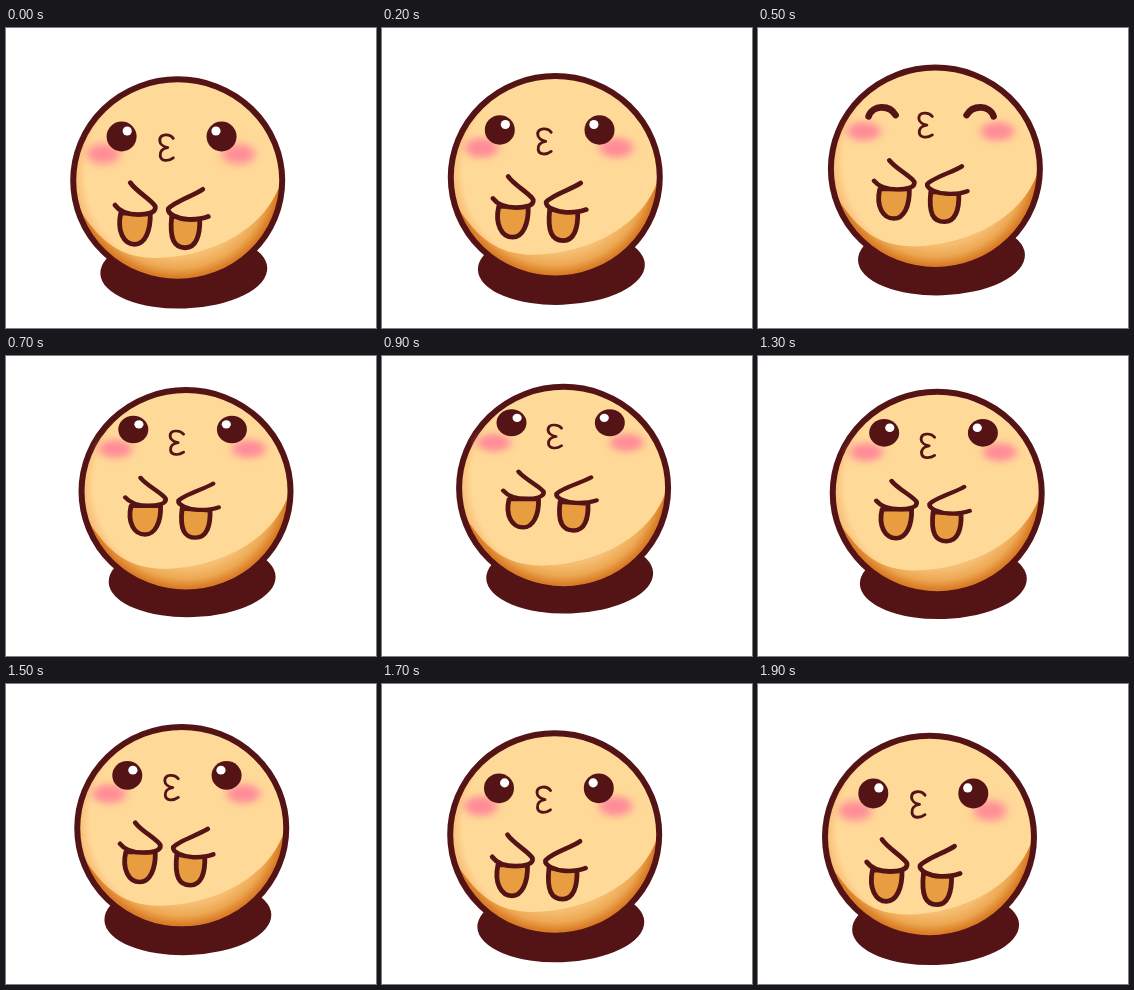
Recreate the animation shown at these times as an HTML page. Size 370 px wide and 300 px high, loop 2000 ms.

```html
<!DOCTYPE html>
<html lang="en">
<head>
<meta charset="utf-8">
<title>Nodding kiss face</title>
<style>
  html, body { margin: 0; width: 100%; height: 100%; overflow: hidden; background: #fff; }
  svg { display: block; width: 370px; height: 300px; --p: 0; --ink: #541416; }
  /* --p runs from 0 (head low) to 1 (head high); each part has its own travel */
  .part { transform: translate(calc(var(--p) * var(--dx)), calc(var(--p) * var(--dy))); }
  .squash { transform: scaleY(calc(1 - var(--flat) * var(--p))); }
  .line { fill: none; stroke: var(--ink); stroke-linecap: round; stroke-linejoin: round; }
  .finger { fill: #e89e40; }
  .palm { fill: #ffd998; }
  .ink { fill: var(--ink); }
  .closed, .blink .open { display: none; }
  .blink .closed { display: inline; }
</style>
</head>
<body>
<svg id="face" viewBox="0 0 370 300">
  <defs>
    <radialGradient id="shade" gradientUnits="userSpaceOnUse" cx="0" cy="0" r="1"
      gradientTransform="translate(171.5 153) scale(103 99.5)">
      <stop offset=".77" stop-color="#f6be72"/>
      <stop offset=".88" stop-color="#eda852"/>
      <stop offset=".97" stop-color="#da7d26"/>
    </radialGradient>
    <radialGradient id="rim" gradientUnits="userSpaceOnUse" cx="0" cy="0" r="1"
      gradientTransform="translate(178 146) scale(112 110)">
      <stop offset=".88" stop-color="#f0a050" stop-opacity="0"/>
      <stop offset="1" stop-color="#f0a050" stop-opacity=".6"/>
    </radialGradient>
    <ellipse id="ball" cx="171.5" cy="153" rx="104.5" ry="101.2"/>
    <clipPath id="inside"><use href="#ball"/></clipPath>
    <filter id="soft" x="-50%" y="-80%" width="200%" height="260%">
      <feGaussianBlur stdDeviation="4"/>
    </filter>
    <g id="eye">
      <g class="open squash" style="--flat:.1">
        <circle class="ink" r="15"/>
        <circle cx="5.6" cy="-5.5" r="4.6" fill="#fff"/>
      </g>
      <path class="line closed" stroke-width="6.6" d="M-13 3.8C-9-8 8-8 14 2.600"/>
    </g>
    <g id="blush">
      <g class="squash" style="--flat:.12">
        <ellipse rx="16.8" ry="10" fill="#ff8c98" filter="url(#soft)"/>
      </g>
    </g>
  </defs>

  <g class="part" style="--dx:10.3px;--dy:-24px">
    <ellipse class="ink" rx="83.5" ry="37.8" transform="translate(177.6 243.2) rotate(-2)"/>
  </g>

  <g class="part" style="--dx:10.3px;--dy:-21.4px">
    <use href="#ball" fill="#ffd998"/>
    <use href="#ball" fill="url(#rim)"/>
    <path clip-path="url(#inside)" fill="url(#shade)"
      d="M277 145C266 200 206 230 148 230.500C114 230 94 214 74 183L60 270H290Z"/>
    <use href="#ball" class="line" stroke-width="6"/>
  </g>

  <g class="part" style="--dx:15px;--dy:-41px">
    <use href="#blush" transform="translate(97 126.800)"/>
  </g>
  <g class="part" style="--dx:13px;--dy:-41px">
    <use href="#blush" transform="translate(232 126.800)"/>
  </g>

  <g class="part" style="--dx:14.500px;--dy:-43.500px">
    <use href="#eye" transform="translate(115.300 109.400)"/>
  </g>
  <g class="part" style="--dx:12.800px;--dy:-43.500px">
    <use href="#eye" transform="translate(215.300 109.400) scale(-1 1)"/>
  </g>

  <g class="part" style="--dx:12.800px;--dy:-40.800px">
    <g transform="translate(160 120.700)">
      <path class="line squash" style="--flat:.1" stroke-width="2.900"
        d="M7-9.500C3.500-14.500-6.500-14.500-6.500-7.500C-6.500-3.500-2-1 1.500-.3C-4 .5-6.500 4-6 8C-5.300 13.500 2 13.800 7 10"/>
    </g>
  </g>

  <g class="part" style="--dx:12.800px;--dy:-40.600px">
    <g class="line" stroke-width="4.800" transform="translate(0 155)">
      <g class="squash" style="--flat:.1">
        <path class="finger" d="M114.500 31C110.500 49 117.500 62.300 128.500 62.300C138.500 62.300 144.500 49 144 31Z"/>
        <path class="finger" d="M165.500 34C163 57 168 65.700 179 65.700C190 65.700 194 53 193.500 36Z"/>
      </g>
      <g class="squash" style="--flat:.16">
        <path class="palm" d="M124 .5C130 9.500 147 19 149 24.500C150 31 140 32.500 132 32.500C122 32.500 113 29 108.700 23"/>
        <path class="palm" d="M196.500 7.200C188 13.200 166 20.500 162 26.800C161 32 172 37 182 37.400C190 37.700 197 36.500 202 34.500"/>
      </g>
    </g>
  </g>
</svg>
<script>
  const face = document.getElementById('face');
  const LOOP = 2000, STEP = 100, TOP = 1000, LOW = 1900;
  const ease = u => (1 - Math.cos(Math.PI * u)) / 2;

  function lift(t) {
    if (t >= TOP && t < LOW) return 1 - ease((t - TOP) / (LOW - TOP));
    const sinceLow = (t - LOW + LOOP) % LOOP;
    return ease(sinceLow / (LOOP - LOW + TOP));
  }

  function draw() {
    const t = Math.floor(performance.now() % LOOP / STEP) * STEP;
    face.style.setProperty('--p', lift(t).toFixed(4));
    face.classList.toggle('blink', t >= 400 && t < 700);
    requestAnimationFrame(draw);
  }
  draw();
</script>
</body>
</html>
```
